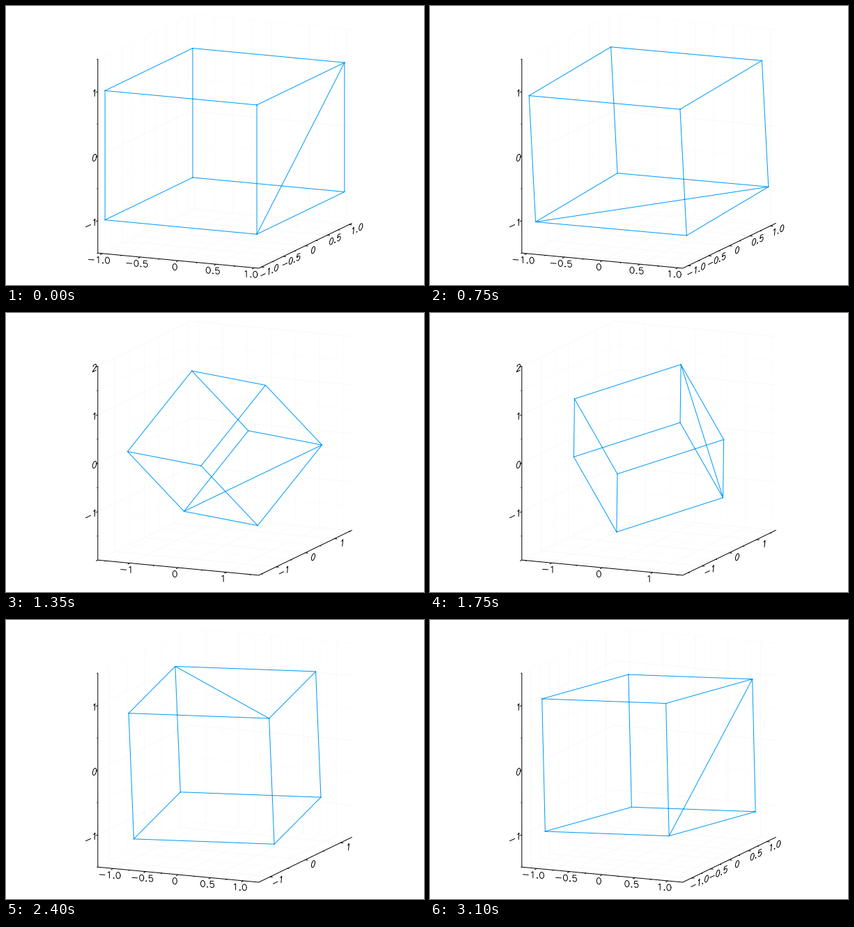
Recreate the animation shown at these times as a matplotlib script. Size 600 by 400 pixels, loop 3150 ms.

```python
import math
import itertools
import numpy as np
import matplotlib.pyplot as plt
from matplotlib.animation import FuncAnimation

W, H, DPI = 600, 400, 100
FRAMES, INTERVAL = 63, 50
PX = 72 / DPI

# Orthographic view: half-axes of the plot box on screen
CENTRE = np.array([314.0, 193.9])
BASIS = np.array([[115.5, 10.9], [66.7, -32.2], [0.0, -139.0]])
SIZE = 0.435

CUBE = np.array(list(itertools.product((-1, 1), repeat=3)), float)
EDGES = [(a, b) for a, b in itertools.combinations(range(8), 2)
         if np.abs(CUBE[a] - CUBE[b]).sum() == 2]
EDGES.append((4, 7))


def arc(cx, cy, rx, ry, start, end):
    a = np.radians(np.linspace(start, end, 17))
    return np.column_stack([cx + rx * np.cos(a), cy + ry * np.sin(a)])


# Single-stroke glyphs, cap height 21: advance width and path
GLYPHS = {
    "0": (20, arc(10, 10.5, 7, 10.5, 0, 360)),
    "1": (20, np.array([(6, 17), (11, 21), (11, 0)])),
    "2": (20, np.vstack([arc(10, 15, 6, 6, 170, -30), [(3, 0), (17, 0)]])),
    "5": (20, np.vstack([[(15, 21), (5, 21), (4, 12)],
                         arc(10.5, 7, 6.5, 7, 140, -150)])),
    ".": (10, arc(5, 1, 1, 1, 0, 360)),
    "-": (26, np.array([(4, 9), (22, 9)])),
}


def style(right, up, offset, align, tick):
    return (SIZE * np.array(right), SIZE * np.array(up),
            np.array(offset), align, np.array(tick))


# Text direction, text up, label offset, alignment and major tick of x, y, z
STYLES = [
    style((1, 0.07), (0, -1), (-5, 9), 0.5, (-3.2, 1.6)),
    style((0.82, -0.4), (0.12, -1.06), (11.5, 6), 0.5, (4, 0.4)),
    style((0.9, -0.43), (0.08, -1.06), (-0.8, 0.4), 1, (-2.6, 1.3)),
]


def project(p):
    return CENTRE + np.asarray(p, float) @ BASIS


def rotation(t):
    c, s = math.cos(t), math.sin(t)
    rx = np.array([[1, 0, 0], [0, c, -s], [0, s, c]])
    ry = np.array([[c, 0, s], [0, 1, 0], [-s, 0, c]])
    rz = np.array([[c, -s, 0], [s, c, 0], [0, 0, 1]])
    return rz @ ry @ rx


def tick_unit(half):
    return 0.5 if 2 * half <= 2.5 else 1.0


def axis_point(axis, u):
    p = [1 if axis == 1 else -1, -1, -1]
    p[axis] = u
    return project(p)


def grid_line(axis, u):
    """Line of one tick across the two walls it touches."""
    path = [(-1, -1, -1), (-1, 1, -1), (1, 1, -1)]
    if axis == 0:
        path = [(u, -1, -1), (u, 1, -1), (u, 1, 1)]
    elif axis == 1:
        path = [(1, u, -1), (-1, u, -1), (-1, u, 1)]
    else:
        path = [(x, y, u) for x, y, _ in path]
    return project(path)


def write(text, anchor, right, up, align):
    x = -align * sum(GLYPHS[ch][0] for ch in text)
    strokes = []
    for ch in text:
        width, pts = GLYPHS[ch]
        strokes.append(anchor + np.outer(x + pts[:, 0], right)
                       + np.outer(pts[:, 1] - 10.5, up))
        x += width
    return strokes


def join(parts):
    gap = np.full((1, 2), np.nan)
    return np.vstack([q for p in parts for q in (p, gap)]).T


fig = plt.figure(figsize=(W / DPI, H / DPI), dpi=DPI, facecolor="white")
ax = fig.add_axes([0, 0, 1, 1])
ax.set_xlim(0, W)
ax.set_ylim(H, 0)
ax.axis("off")


def layer(color, cap="butt"):
    line, = ax.plot([], [], color=color, lw=PX, snap=False,
                    solid_capstyle=cap, solid_joinstyle="miter")
    return line


minor_grid = layer("#fcfcfc")
major_grid = layer("#f9f9f9")
axis_line = layer("black", "projecting")
tick_line = layer("black")
label_line = layer("black", "round")
cube_line = layer("#009afa", "projecting")
axis_line.set_data(*project([(-1, -1, 1), (-1, -1, -1), (1, -1, -1),
                             (1, 1, -1)]).T)


def update(i):
    pts = CUBE @ rotation(0.1 * i).T
    lim = 1.06 * np.abs(pts).max(axis=0)
    unit = tick_unit(lim[2])
    lim[2] = math.ceil(lim[2] / unit) * unit

    minor, major, ticks, labels = [], [], [], []
    for axis, (right, up, offset, align, tick) in enumerate(STYLES):
        step = tick_unit(lim[axis]) / 2
        count = math.floor(lim[axis] / step + 1e-9)
        for k in range(-count, count + 1):
            u = k * step / lim[axis]
            big = k % 2 == 0
            (major if big else minor).append(grid_line(axis, u))
            base = axis_point(axis, u)
            ticks.append([base, base + tick * (1 if big else 0.5)])
            if big and u > -0.999:
                digits = 1 if step < 0.5 else 0
                text = f"{k * step:.{digits}f}" if k else "0"
                labels += write(text, base + offset, right, up, align)

    minor_grid.set_data(*join(minor))
    major_grid.set_data(*join(major))
    tick_line.set_data(*join(ticks))
    label_line.set_data(*join(labels))
    screen = project(pts / lim)
    cube_line.set_data(*join([screen[list(e)] for e in EDGES]))
    return minor_grid, major_grid, tick_line, label_line, cube_line


anim = FuncAnimation(fig, update, frames=FRAMES, interval=INTERVAL,
                     repeat=True, repeat_delay=0)
plt.show()
```
